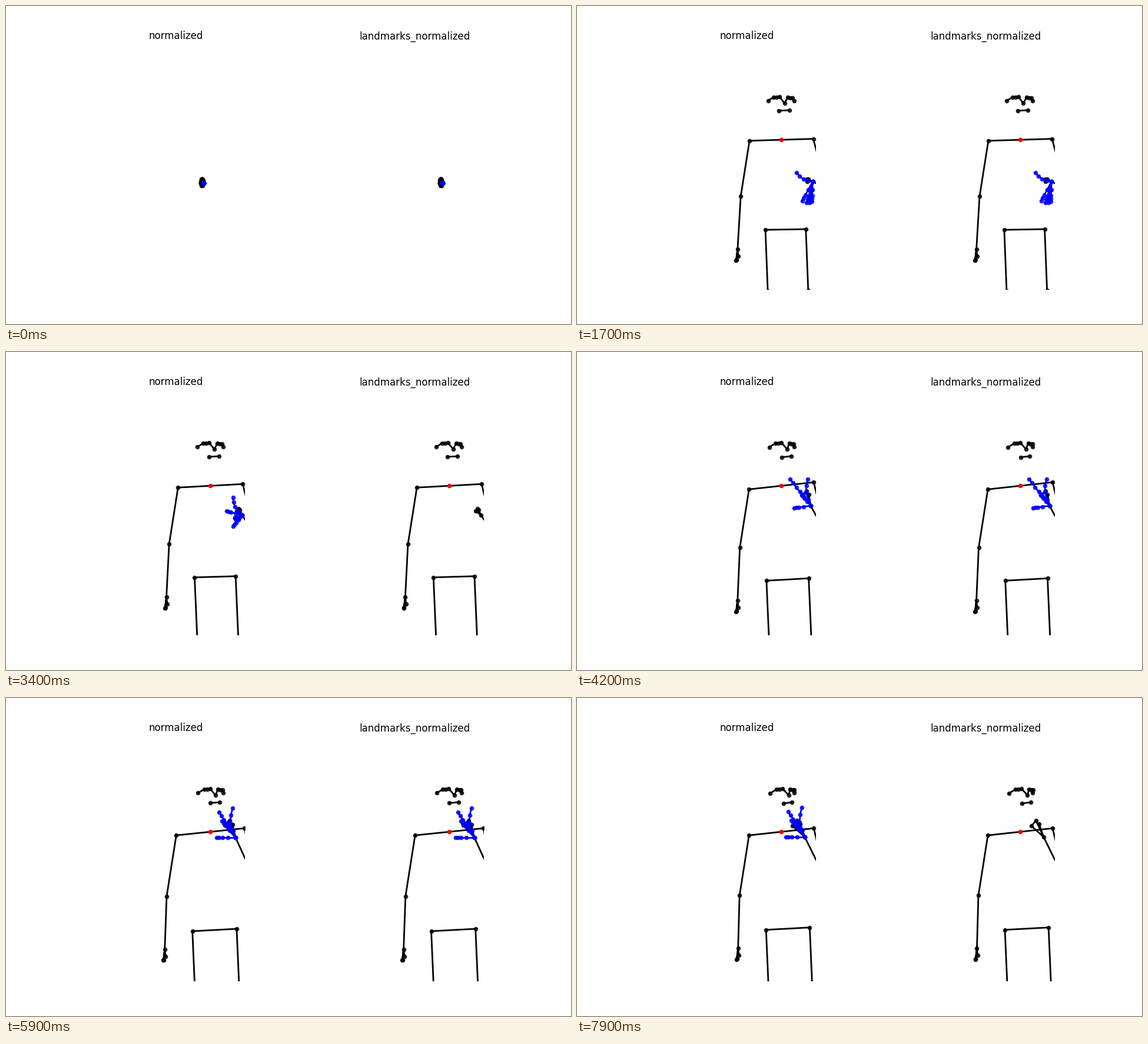
Animation of 960x540 px, one loop 8000 ms. Source, as a matplotlib script:

```python
import numpy as np
import matplotlib.pyplot as plt
from matplotlib.animation import FuncAnimation
from matplotlib.collections import LineCollection

W, H, STEP, FRAMES = 960, 540, 100, 80
BOX_W, BOX_H = 233.89, 415.8
LEFT, PANEL_GAP = 172.15, 405.82
HOLD = 8.38          # frames between two new body poses

# Points are complex numbers x + yj in stage pixels.
NECK, ELBOW = 347.3 + 227.2j, 423 + 309j

# Key values for the six stages of raising the left hand.
SIZE = (1, 0.995, 1.01, 1.04, 1.09, 1.075)
SHOULDER = (56 - 3j, 54 - 1.5j, 55 - 3j, 55 - 6j, 58 - 6j, 55 - 6j)
TURN = (0, 4, 5, 8, 7, 10.5)
HIP_SHIFT = (4, 7.5, 8, 10.5, 7, 11)
WRIST = (414 + 345j, 399 + 293j, 401 + 277j, 397 + 261j, 390 + 237j, 387 + 236j)
INDEX = (-10 + 19j, -10 - 7j, -6 - 11j, -7 - 25j, -10 - 29j, -13 - 28j)

# Fingertips from the wrist, thumb to little finger.
OPEN = np.array([-26 - 15j, -18 + 31j, -11 + 35j, -6 + 35j, -2 + 33j])
LOW = OPEN * 1.3 * np.exp(-0.2j)
SIGN = np.array([-5 - 45j, -35 - 45j, -18 - 24j, -14 - 17j, -28 + 4j])
HIGH = np.array([-5 - 50j, -28 - 43j, -14 - 25j, -23 - 28j, -32])

# Joints along a finger, as fractions of the way to its tip.
THUMB = np.array([0, 0.24 - 0.06j, 0.52 - 0.12j, 0.77 - 0.08j, 1])
STRAIGHT = np.array([0, 0.42, 0.7, 0.86, 1])
CURLED = np.array([0, 0.75, 1, 0.8, 0.6])

# Ear, eye, nose, eye, ear, then mouth: rest place and drift per unit of turn.
FACE = np.array([323 + 160j, 331 + 155j, 336 + 154.5j, 341 + 154j, 349 + 165j,
                 356 + 155j, 360 + 155.5j, 364 + 156j, 368.5 + 161j,
                 339 + 177j, 358 + 177j])
DRIFT = np.array([0.45 + 0.2j, 0.8, 0.8, 0.8, 1, 0.6, 0.55, 0.5, 0,
                  1.1 + 0.2j, 0.7])

CHAINS = [range(9), (9, 10), (11, 17), (11, 12, 13, 14, 15, 13, 16),
          (17, 18, 19, 20, 21, 19, 22), (23, 24), (23, 25, 27), (24, 26, 28)]


def track(keys, stage):
    return np.interp(stage, range(6), keys)


def stage_of(n):
    return np.interp(n, (1, 2, 3, 4, 5, 7, 9), (0, 0.9, 1, 2, 3, 4, 5))


def wrist_at(stage, n):
    return track(WRIST, stage) + (14 + 60j if n < 1 else 0)


def body_at(n):
    s = stage_of(n)
    size, turn = track(SIZE, s), track(TURN, s)
    shoulder = track(SHOULDER, s)

    right = NECK - shoulder
    elbow = right + (-15 + 95j) * size
    wrist = elbow - 6 + 0.7 * s + 90j
    right_arm = [right, elbow, wrist,
                 wrist - 2.5 + 18.5j, wrist - 2 + 18j, wrist + 1.5 + 12j]

    wrist, index = wrist_at(s, n), track(INDEX, s)
    left_arm = [NECK + shoulder, ELBOW, wrist, wrist + 0.9 * index * np.exp(-0.4j),
                wrist + index, wrist + 0.75 * index * np.exp(0.1j)]

    hip = NECK + track(HIP_SHIFT, s) + 153j * size
    half = 34.5 * size + shoulder.imag / 3 * 1j
    hips = np.array([hip - half, hip + half])
    knees = hips + 4.5 * min(s, 1) + 104j
    return np.concatenate([FACE + DRIFT * turn, right_arm, left_arm,
                           hips, knees, knees + 110j])


def hand_at(i, n):
    """The left hand and whether it was detected (else it glides along)."""
    found = not (26 <= i < 42 or i >= 68)
    s = stage_of(n) if found else np.interp(i, (26, 42, 67, 79), (1, 3, 4, 5))
    curl = np.clip((s - 1) / 2, 0, 1)
    folded = STRAIGHT + (CURLED - STRAIGHT) * curl
    paths = [THUMB, STRAIGHT, folded, STRAIGHT, STRAIGHT]
    tips = [np.interp(s, (0, 1, 3, 4), k) for k in zip(LOW, OPEN, SIGN, HIGH)]
    fingers = [tip * path for tip, path in zip(tips, paths)]
    return wrist_at(s, n) + np.array(fingers), found


def shrink(z):
    return (z - (347 + 160j)) * 0.025 + (333 + 294j)


def xy(z):
    return np.stack([np.real(z), np.imag(z)], axis=-1)


class Panel:
    def __init__(self, fig, x, title):
        self.ax = ax = fig.add_axes([x / W, 0.11, BOX_W / W, BOX_H / H])
        ax.set_xlim(LEFT, LEFT + BOX_W)
        ax.set_ylim(480.6, 64.8)
        ax.axis("off")
        ax.set_title(title, fontsize=12)
        self.bones = self.lines("black", 1)
        self.red = self.dots("red", 2, alpha=1)
        self.joints = self.dots("black", 3)
        self.hand_bones = self.lines("blue", 4)
        self.hand_joints = self.dots("blue", 5)

    def dots(self, color, z, alpha=0.8):
        return self.ax.scatter([], [], s=20, c=color, alpha=alpha, lw=1, zorder=z)

    def lines(self, color, z):
        lines = LineCollection([], colors=color, linewidths=2, zorder=z,
                               capstyle="projecting", joinstyle="round")
        return self.ax.add_collection(lines, autolim=False)

    def draw(self, body, hand, neck):
        self.joints.set_offsets(xy(body))
        self.bones.set_segments([xy(body[list(c)]) for c in CHAINS])
        self.hand_joints.set_offsets(xy(hand).reshape(-1, 2))
        self.hand_bones.set_segments(list(xy(hand)))
        self.red.set_offsets([xy(neck)])


fig = plt.figure(figsize=(W / 100, H / 100), dpi=100, facecolor="white")
filled = Panel(fig, LEFT, "normalized")
raw = Panel(fig, LEFT + PANEL_GAP, "landmarks_normalized")


def update(i):
    n = int(np.ceil(i / HOLD)) - 1
    body, neck = body_at(max(n, 0)), NECK
    hand, found = hand_at(i, max(n, 0))
    if n < 0:
        body, hand, neck = shrink(body), shrink(hand) + 1, shrink(neck) + 1.5
    filled.draw(body, hand, neck)
    raw.draw(body, hand if found else hand[:0], neck)
    return []


anim = FuncAnimation(fig, update, frames=FRAMES, interval=STEP,
                     init_func=lambda: update(0), repeat=True, repeat_delay=0)
plt.show()
```
